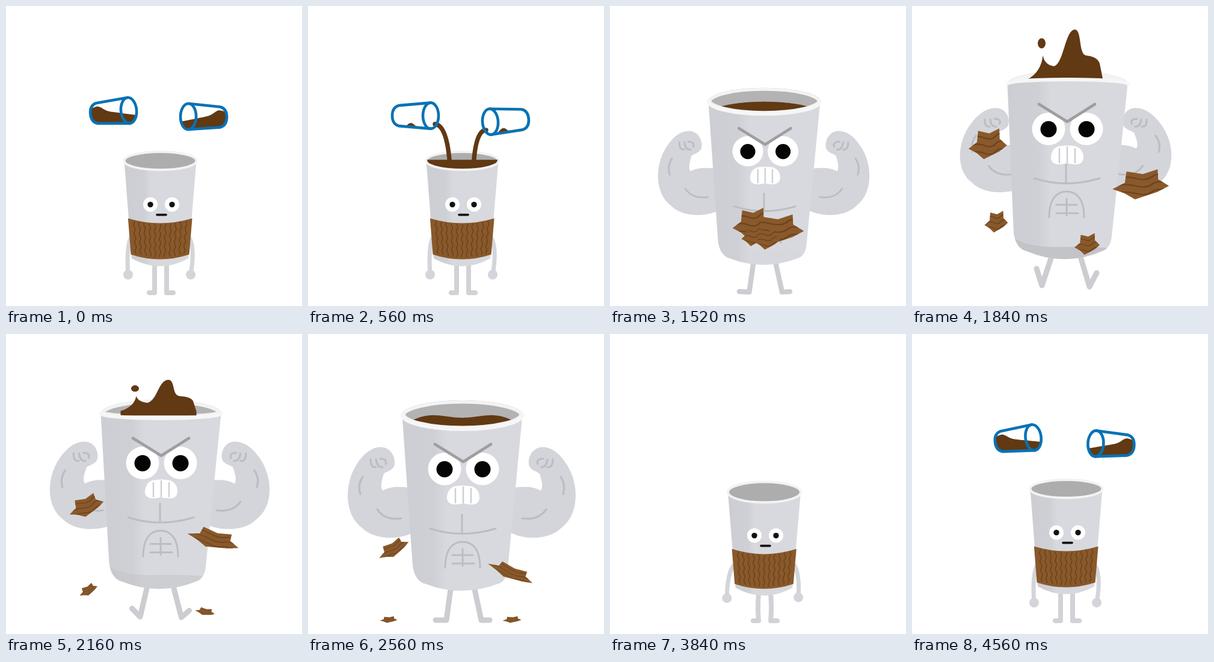
These frames come from a looping animation (492 px wide and 498 px high, 4.64 s). An HTML page with a canvas:

```html
<!DOCTYPE html>
<html lang="en">
<head>
<meta charset="utf-8">
<title>Coffee power</title>
<style>
html, body { margin: 0; width: 100%; height: 100%; overflow: hidden; background: #fff; }
canvas { display: block; }
</style>
</head>
<body>
<canvas id="stage" width="492" height="498"></canvas>
<script>
const c = document.getElementById('stage').getContext('2d');
const LOOP = 4640, STEP = 80;
const BURST = 1440, CALM = 3440, REFILL = 4400, FLOOR = 474;
const PAPER = '#d8d9de', SHADE = '#cdced3', LIMB = '#d4d5da', RIM = '#f3f3f4', LINE = '#bcbdc2';
const COFFEE = '#613913', KRAFT = '#89592b', GROOVE = '#6c431c', BLUE = '#0872b4';

const lerp = (a, b, u) => a + (b - a) * u;
const clamp = u => Math.max(0, Math.min(1, u));
const bump = (x, at, w) => Math.exp(-(((x - at) / w) ** 2));
// Smooth step from 0 at time a to 1 at time b.
function ease(a, b, t) {
  const u = clamp((t - a) / (b - a));
  return u * u * (3 - 2 * u);
}

const svg = d => new Path2D(d);
function fill(path, color) { c.fillStyle = color; c.fill(path); }
function stroke(path, color, width) {
  c.strokeStyle = color; c.lineWidth = width; c.lineCap = c.lineJoin = 'round';
  c.stroke(path);
}
function ellipse(x, y, rx, ry = rx, turn = 0) {
  const p = new Path2D();
  p.ellipse(x, y, rx, ry, turn, 0, 7);
  return p;
}
function within(draw) { c.save(); draw(); c.restore(); }

// Everything below the curve y(x), between x0 and x1.
function liquid(x0, x1, bottom, y) {
  const p = new Path2D();
  p.moveTo(x0, bottom);
  for (let x = x0; x <= x1; x += 2) p.lineTo(x, y(x));
  p.lineTo(x1, bottom);
  fill(p, COFFEE);
}

function paperShade(x0, x1) {
  const g = c.createLinearGradient(x0, 0, x1, 0);
  g.addColorStop(0, SHADE);
  g.addColorStop(.27, '#cfd0d5');
  g.addColorStop(.37, PAPER);
  return g;
}

/* ---------- small cup ---------- */
function sleeve(side, slump, sag) {
  const top = .59 + slump * .04;
  const [a, b] = side(top), [d, e] = side(.96);
  fill(svg(`M${a[0] - 1} ${a[1]}Q${(a[0] + b[0]) / 2} ${(a[1] + b[1]) / 2 + sag * 2} ${b[0] + 1} ${b[1]}
    L${e[0] + 1} ${e[1]}Q${(d[0] + e[0]) / 2} ${(d[1] + e[1]) / 2 + 16} ${d[0] - 1} ${d[1]}Z`), KRAFT);
  for (let i = 1; i < 12; i++) {
    const u = i / 12, p = new Path2D(), arch = 4 * u * (1 - u);
    for (let v = .03; v < .97; v += .05) {
      const [l, r] = side(lerp(top, .96, v));
      p.lineTo(lerp(l[0], r[0], u) + Math.sin(v * 26 + i) * 1.3,
        lerp(l[1], r[1], u) + arch * lerp(sag, 8, v));
    }
    stroke(p, GROOVE, 1.6);
  }
}

function smallFace(x, y, shut) {
  if (shut) {
    stroke(svg(`M${x - 27} ${y - 3}Q${x - 16} ${y - 3} ${x - 7} ${y + 2}M${x + 8} ${y + 3}
      Q${x + 14} ${y - 3} ${x + 27} ${y - 4}M${x - 8} ${y + 12}Q${x} ${y + 6} ${x + 9} ${y + 12}`), '#111', 3);
    return;
  }
  for (const dx of [-18, 18]) {
    fill(ellipse(x + dx, y, 12), '#fff');
    fill(ellipse(x + dx, y, 4.7), '#111');
  }
  stroke(svg(`M${x - 7} ${y + 17}H${x + 8}`), '#111', 3.6);
}

function smallCup(t) {
  const drinking = t < BURST, since = t - CALM;
  const slump = drinking ? ease(560, 860, t) - 1.5 * ease(1300, BURST, t)
    : Math.exp(-since / 180) * Math.cos(since / 64);
  const sway = drinking ? clamp(slump) * Math.cos((t - 960) / 51) : 0;
  const coffee = drinking ? ease(160, 640, t) : 0;
  const arm = Math.min(1, Math.abs(slump) * 1.4);

  const cx = 256.5 - 16.5 * sway, cy = 257 + 51 * slump, tilt = 6 * sway;
  const rx = 60 + 5 * slump, ry = 15 + 19 * slump;
  const bx = 256 - 1.5 * sway, by = 419 + 21 * slump, bw = 47 + 2 * slump;
  const side = u => [-1, 1].map(s =>
    [lerp(cx + s * rx, bx + s * bw, u), lerp(cy, by, u) - s * tilt * (1 - u / 2)]);

  const bow = 20 * slump;
  stroke(svg(`M247 ${by + 8}Q${247 - bow} 456 247 476H238
    M267 ${by + 8}Q${267 + bow} 456 267 476H278`), '#d1d2d6', 8);
  const [l, r] = side(lerp(.8, .56, arm));
  const hands = [[lerp(203, 146, arm), lerp(446, 396, arm)], [lerp(307, 347, arm), lerp(446, 388, arm)]];
  stroke(svg(`M${l}Q${lerp(200, 165, arm)} ${lerp(405, 360, arm)} ${hands[0]}
    M${r}Q${lerp(314, 325, arm)} ${lerp(405, 374, arm)} ${hands[1]}`), LIMB, 7);
  hands.forEach(h => fill(ellipse(...h, 8), LIMB));

  const [a, b] = side(0), [d, e] = side(1), turn = -Math.atan2(tilt, rx);
  fill(svg(`M${a}L${d}Q${bx} ${by + 26} ${e}L${b}Z`), paperShade(a[0], b[0]));
  const mouth = ellipse(cx, cy, rx, ry, turn);
  const arc = sweep => svg(`M${a}A${rx} ${ry} ${turn * 180 / Math.PI} 0 ${sweep} ${b}`);
  fill(mouth, '#adadad');
  stroke(arc(1), RIM, 4);

  const pour = clamp((t - 80) / 160);
  if (pour && t < 720) {
    const y = lerp(205, 268, pour);
    stroke(svg(`M211 196Q232 198 236 ${y}M296 206Q278 206 275 ${y}`), COFFEE, 9 - 6 * ease(480, 720, t));
  }
  if (coffee) {
    within(() => {
      c.clip(mouth);
      liquid(cx - rx, cx + rx + 2, cy + ry + 8, x => {
        const u = (x - cx) / rx;
        return cy + ry * (1 - coffee * 1.2) - sway * (6 * u + 22 * u ** 3);
      });
    });
    const h = Math.abs(sway);
    if (h > .4) within(() => {
      c.translate(cx, cy);
      c.scale(Math.sign(sway), 1);
      fill(svg(`M28 -8Q40 -10 46 ${-21 * h}L51 ${-18 * h}Q60 ${-22 * h} 64 ${-32 * h}
        Q69 -17 63 -2Q52 12 30 10Z`), COFFEE);
      fill(ellipse(-20, -29 * h, 7), COFFEE);
      fill(ellipse(-29, -17 * h, 3), COFFEE);
    });
  }
  stroke(arc(0), RIM, 4);
  sleeve(side, slump, 8 + 5 * slump);
  smallFace(bx + 2, lerp(cy + ry, by + 13, .36 - .04 * slump), drinking && t >= 640);
}

/* ---------- glasses ---------- */
const GLASS = svg('M0 21.5L-53 17Q-64 14 -64 0Q-64 -14 -53 -17L0 -21.5');

// Glasses swing in upright, tip over and empty themselves.
function glass(side, t) {
  const left = 1 - clamp(((t - REFILL + LOOP) % LOOP) / 240);
  const swing = 1 - left ** 3, emptied = t < REFILL ? ease(0, 800, t) : 0;
  const extra = side < 0 ? 1 : 0;
  const deg = lerp(-90, -5, swing) + 5 * ease(0, 500, t % REFILL) + 4 * extra;
  within(() => {
    c.translate(253.5 - side * lerp(114, 49.5, swing), lerp(130, 173.5, swing) + 10 * extra + 11 * emptied);
    c.scale(side, 1);
    c.rotate(deg * Math.PI / 180);
    const mouth = ellipse(0, 0, 13, 21.5), inside = new Path2D(GLASS);
    inside.addPath(mouth);
    within(() => {
      c.clip(inside);
      if (swing < .5) { c.fillStyle = COFFEE; c.fillRect(-64, -24, 40, 48); }
      else liquid(-64, 14, 24, x => Math.min(6 + .22 * x - 6 * bump(x, -50, 10) + 34 * emptied,
        21 - 9 * bump(x, -33 + 3 * deg, 9)));
    });
    stroke(GLASS, BLUE, 4.6);
    stroke(mouth, BLUE, 4.6);
  });
}

/* ---------- strong cup ---------- */
const ARM = svg(`M174 330C150 342 110 342 90 322C60 300 60 250 80 218C92 198 108 186 124 188
  C140 190 147 208 143 220C138 228 130 228 126 232C122 245 120 254 124 260C138 252 156 253 174 256Z`);
const ARM_LINES = svg(`M91 237Q82 250 87 266M115 291Q128 310 155 306
  M104 208Q104 222 113 221M113 208Q115 222 124 221M120 207Q132 207 129 216`);
const CHEST = svg(`M256 300V330M203 323Q256 340 312 323
  M228 388C228 355 242 345 257 345S286 355 286 388M257 357V385M240 367H274M240 381H276`);
const SPLASH = svg(`M-67 10V-2Q-44 -14 -41 -42Q-38 -26 -22 -24C-6 -30 -4 -84 12 -85
  C24 -85 18 -46 30 -42Q52 -40 54 -26L59 -1V10Z`);

function bigFace() {
  for (const x of [227, 290]) {
    fill(ellipse(x, 224, 27.5, 27), '#fff');
    fill(ellipse(x, 224.5, 13.5), '#050505');
  }
  stroke(svg('M211 183L258 212L304 183'), '#9e9ea1', 4.8);
  fill(svg(`M243 253Q258 250 273 253Q285 258 285 272Q284 283 272 283Q265 283 258 281
    Q250 283 243 283Q231 282 231 271Q232 257 243 253Z`), '#fff');
  stroke(svg('M245 257V280M258 254V280M271 257V280'), '#cfd0d4', 2.5);
}

function bigCup(t) {
  const flex = bump(t, 2320, 70) + bump(t, 3200, 60);
  const size = .66 + .54 * ease(BURST, 1600, t) - .2 * ease(1640, 1840, t);
  const shrink = ease(3220, 3400, t);
  const tip = ease(1500, 1680, t) - ease(2000, 2320, t);
  const splash = ease(1560, 1840, t) * (1 - ease(1960, 2440, t));
  const mix = (a, b) => lerp(a, b, tip);

  within(() => {
    c.translate(256, 478);
    c.scale(size + .1 * flex - .22 * shrink, size - .05 * flex - .08 * shrink);
    c.translate(-256, -478);

    stroke(svg(`M${mix(237, 232)} ${mix(424, 416)}L${mix(230, 216)} ${mix(475, 464)}L${mix(212, 207)} ${mix(475, 436)}
      M${mix(277, 280)} ${mix(424, 416)}L${mix(288, 295)} ${mix(475, 466)}L${mix(302, 307)} ${mix(475, 443)}`), '#cccdd1', 9);
    for (const mirror of [false, true]) within(() => {
      if (mirror) { c.translate(511, 0); c.scale(-1, 1); }
      c.transform(1, 0, -.053 * tip, 1 - .07 * tip, 28 * tip, -5.3 * tip);
      fill(ARM, LIMB);
      stroke(ARM_LINES, LINE, 3.2);
    });

    // Tipping back turns the near edge of the rim from hanging to arched.
    const cx = mix(256.5, 258.5), cy = mix(134, 129), back = mix(24, 21), front = mix(24, -7);
    const near = `A100 ${Math.abs(front)} 0 0 ${front > 0 ? 1 : 0} ${cx - 100} ${cy}`;
    const mouth = svg(`M${cx - 100} ${cy}A100 ${back} 0 0 1 ${cx + 100} ${cy}${near}Z`);
    fill(mouth, '#b3b3b4');
    const wave = t < 2240 ? 0 : 8 * Math.exp((2240 - t) / 450) * Math.cos((t - 2560) / 75);
    within(() => {
      c.clip(mouth);
      liquid(cx - 98, cx + 98, cy + 30, x => {
        const u = (x - cx) / 98;
        return cy + 23 - 22 * Math.sqrt(Math.max(0, 1 - u * u)) + wave * Math.cos(u * 5);
      });
      stroke(mouth, RIM, 11);
    });
    if (splash > .02) within(() => {
      c.translate(cx, cy - 5 * tip);
      c.scale(1, splash);
      fill(SPLASH, COFFEE);
      if (splash > .4) fill(ellipse(-43, -62, 6.5, 8.5), COFFEE);
    });

    const base = mix(405, 397), l = mix(178, 173);
    const body = svg(`M${cx - 100} ${cy}L${l - 4} ${base - 20}Q${l} ${base + 6} ${l + 18} ${base + 10}
      Q255 ${mix(438, 434)} 318 ${base + 9}Q330 ${base + 4} 332 ${base - 15}L${cx + 100} ${cy}${near}Z`);
    fill(body, paperShade(155, 358));
    within(() => {
      c.clip(body);
      c.globalAlpha = clamp(tip);
      fill(svg('M160 378Q185 402 250 400Q300 399 340 403V440H160Z'), '#c3c4c8');
    });
    stroke(svg(`M${cx + 100} ${cy}${near}`), '#f6f6f7', 6);

    c.translate(0, -20 * tip);
    bigFace();
    c.translate(0, -17 * tip);
    stroke(CHEST, LINE, 3);
  });
}

/* ---------- torn sleeve ---------- */
const SCRAPS = [
  { x: 126, y: 229, w: 64, h: 51, drift: 30, swing: 0 },
  { x: 380, y: 296, w: 94, h: 50, drift: 29, swing: -60 },
  { x: 140, y: 358, w: 39, h: 36, drift: -6, swing: 0 },
  { x: 291, y: 395, w: 42, h: 36, drift: 48, swing: 0 }
];
const TORN = svg('M-1 .32L-.56 -.1L-.5 -.85L.08 -.68L.6 -1L.62 -.33L1 .1L.6 .5L-.2 1L-.6 .57Z');

// Thrown out from the middle, then sinking like a leaf; wide scraps sink slower.
function scrap({ x, y, w, h, drift, swing }, t) {
  const thrown = ease(1480, 1640, t) * (1 + .45 * bump(t, 1690, 60));
  const speed = .26 - .0013 * w;
  const sunk = clamp((t - 1840) * speed / (FLOOR - y));
  const side = x < 256 ? -1 : 1, flat = 1 - .7 * Math.sqrt(sunk);
  within(() => {
    c.translate(lerp(256, x, thrown) + drift * sunk + swing * Math.sin(Math.PI * sunk),
      lerp(lerp(385, y, thrown), FLOOR, sunk));
    c.rotate(.45 * side * Math.sin(Math.PI * sunk));
    c.scale(w / 2 * lerp(1, .75, sunk), h / 2 * flat);
    fill(TORN, KRAFT);
    c.clip(TORN);
    for (const v of [-.5, 0, .5])
      stroke(svg(`M-1 ${v + .2}Q-.6 ${v - .1} -.2 ${v + .1}T.4 ${v}T1 ${v - .1}`), GROOVE, .08);
  });
}

function draw(t) {
  c.fillStyle = '#fff';
  c.fillRect(0, 0, 492, 498);
  if (t >= BURST && t < CALM) {
    bigCup(t);
    if (t >= 1520 && t < 3360) SCRAPS.forEach(s => scrap(s, t));
  } else smallCup(t);
  if (t < 1200 || t >= REFILL) {
    glass(1, t);
    glass(-1, t);
  }
}

function tick() {
  draw(Math.floor(performance.now() % LOOP / STEP) * STEP);
  requestAnimationFrame(tick);
}
tick();
</script>
</body>
</html>
```
